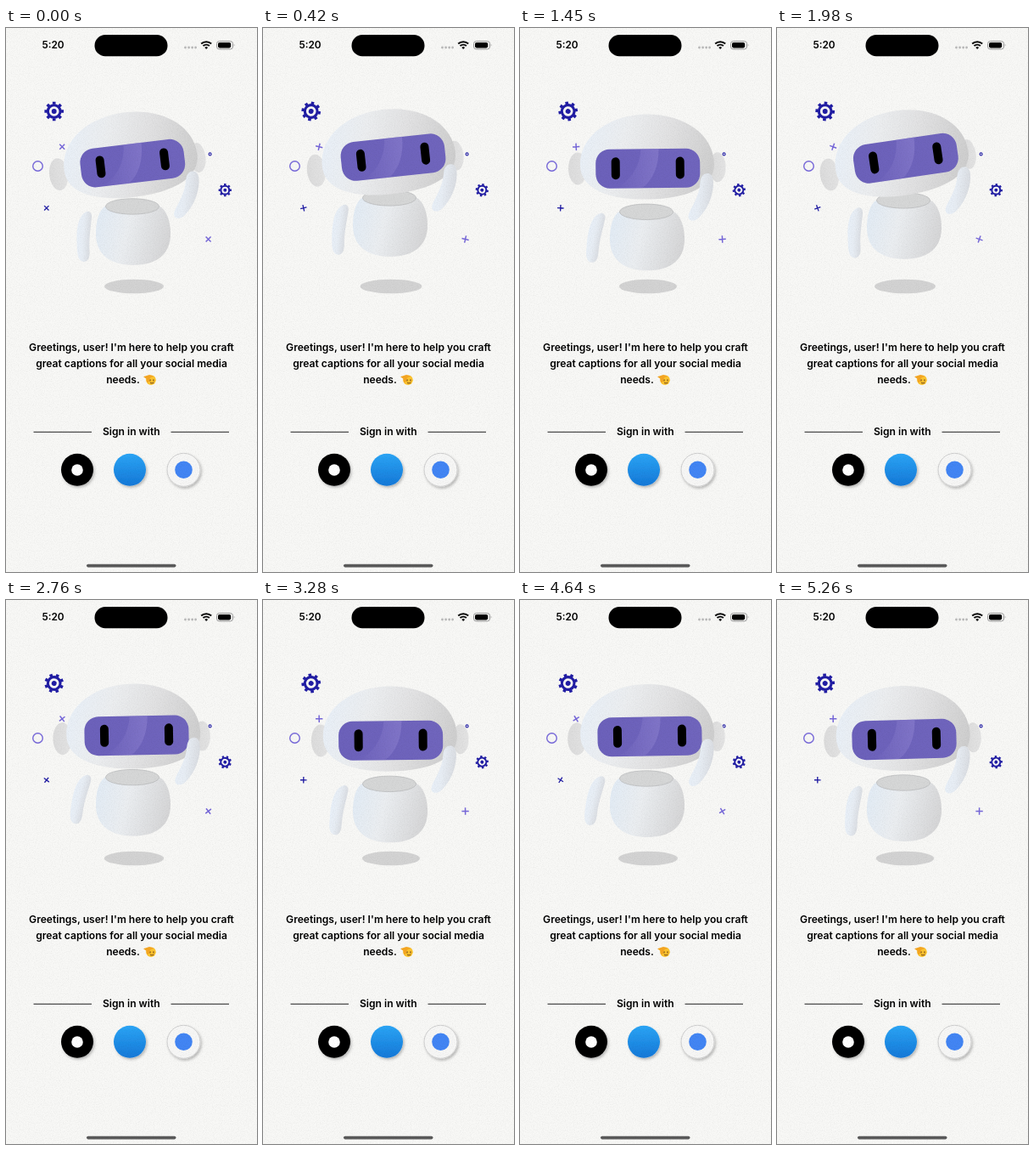
Write an HTML page that moves like this. It is 296 by 640 pixels and loops after 5.3 s.

```html
<!DOCTYPE html>
<html lang="en">
<head>
<meta charset="utf-8">
<title>Sign in</title>
<style>
  html, body { margin: 0; width: 100%; height: 100%; overflow: hidden; background: #f8f8f6; }
  svg { display: block; position: absolute; inset: 0; width: 296px; height: 640px; }
  text { font: 600 12.1px Inter, sans-serif; fill: #000; text-anchor: middle; }
  .clock { font-size: 11.8px; }
  .navy { stroke: #211da4; fill: none; }
  .violet { stroke: #7667d9; fill: none; }
</style>
</head>
<body>
<svg id="stage" viewBox="0 0 296 640">
  <defs>
    <linearGradient id="shell" x1="0" y1=".4" x2="1" y2=".6">
      <stop offset="0" stop-color="#e9f0f8"/><stop offset=".3" stop-color="#eceef0"/><stop offset=".6" stop-color="#e2e2e3"/><stop offset="1" stop-color="#cecece"/>
    </linearGradient>
    <linearGradient id="torso" x1="0" y1=".4" x2="1" y2=".6">
      <stop offset="0" stop-color="#e3ecf5"/><stop offset=".4" stop-color="#ebeef1"/><stop offset="1" stop-color="#d5d5d6"/>
    </linearGradient>
    <linearGradient id="limb" x1="0" y1="0" x2="1" y2=".2">
      <stop offset="0" stop-color="#e9f1fa"/><stop offset=".5" stop-color="#e8eef5"/><stop offset="1" stop-color="#dadde2"/>
    </linearGradient>
    <linearGradient id="ear"><stop offset="0" stop-color="#dcdcdc"/><stop offset="1" stop-color="#e4e4e4"/></linearGradient>
    <linearGradient id="glass"><stop offset="0" stop-color="#6c61bb"/><stop offset="1" stop-color="#7065bd"/></linearGradient>
    <linearGradient id="shine"><stop offset="0" stop-color="#8c80d0" stop-opacity="0"/><stop offset="1" stop-color="#8c80d0" stop-opacity=".6"/></linearGradient>
    <linearGradient id="blue" x1="0" y1="0" x2="0" y2="1"><stop offset="0" stop-color="#2ba5f6"/><stop offset="1" stop-color="#1478d8"/></linearGradient>
    <filter id="soft" x="-30%" y="-30%" width="160%" height="160%">
      <feDropShadow dx="1.5" dy="2" stdDeviation="1.6" flood-opacity=".25"/>
    </filter>
    <path id="plus" d="M-4.2,0H4.2M0,-4.2V4.2" stroke-width="1.5"/>
  </defs>

  <text class="clock" x="55.5" y="24.3">5:20</text>
  <rect x="104.5" y="8" width="86" height="25.300" rx="12.650"/>
  <g fill="#b9b9b9"><circle cx="211.5" cy="23" r="1.4"/><circle cx="215.6" cy="23" r="1.4"/><circle cx="219.7" cy="23" r="1.4"/><circle cx="223.6" cy="23" r="1.4"/></g>
  <g fill="none" stroke="#080808" stroke-width="2">
    <path d="M230.2,18.6A8.8,8.8 0 0 1 242.2,18.6M232.5,21.1A5.4,5.4 0 0 1 239.9,21.1"/>
    <path d="M236.2,25L234.3,22.9A2.8,2.8 0 0 1 238.1,22.9Z" fill="#080808" stroke="none"/>
  </g>
  <rect x="248.5" y="15.5" width="19" height="9.4" rx="3" fill="none" stroke="#999"/>
  <rect x="250" y="17" width="15.2" height="6.4" rx="1.8"/>
  <path d="M268.8,18.6q1.5,1.6 0,3.2z" fill="#999"/>

  <g id="decor">
    <circle class="violet" cx="37.5" cy="162.5" r="5.8" stroke-width="1.4"/>
    <circle class="navy" cx="240.6" cy="148.4" r="1.5" stroke-width="1.1"/>
  </g>

  <ellipse id="shadow" cx="151" cy="304" rx="35" ry="8.3" fill="#d3d3d3"/>

  <g id="body">
    <path d="M118,209C109,214 106,228 106,242C106,266 122,279 150,279C178,279 194,266 194,242C194,228 190,214 180,209Z" fill="url(#torso)"/>
    <ellipse cx="149" cy="210" rx="31.5" ry="9.2" fill="#d6d7d7" stroke="#bcbdbe" stroke-width=".8"/>
  </g>
  <path id="leftArm" d="M95,216C99,215 101.5,218 101,223C100,235 97.5,248 98.5,262C99,270 97,275 92,275C87,275 84.5,270 84,262C83,246 82,222 95,216Z" fill="url(#limb)"/>

  <g id="ears" fill="url(#ear)">
    <ellipse cx="-83" cy="13" rx="11" ry="19"/>
    <ellipse cx="82" cy="13" rx="9.5" ry="17.5"/>
  </g>
  <path id="head" d="M-79,9C-79,-26 -43,-50 0,-50C43,-50 79,-26 79,9C79,36 48,50 0,50C-48,50 -79,36 -79,9Z" fill="url(#shell)"/>
  <g id="visor">
    <rect x="-61.5" y="-23" width="123" height="46" rx="16.5" fill="url(#glass)"/>
    <path d="M-38,23Q-10,8 -8,-23H13C13,-3 6,14 -7,23Z" fill="url(#shine)"/>
    <rect x="-43" y="-13.3" width="10" height="26" rx="5"/>
    <rect x="33" y="-13.3" width="10" height="26" rx="5"/>
  </g>
  <path id="rightArm" d="M220,168.500C226,168 228,174 227.500,182C227,196 220,211 211,220C206,225 200,225 198.500,221C197,217 201,211 204,205C209,195 211,189 212,180C212.500,173 215,169 220,168.500Z" fill="url(#limb)"/>

  <text x="148" y="379.8">Greetings, user! I'm here to help you craft</text>
  <text x="148" y="398.8">great captions for all your social media</text>
  <text x="138" y="417.8">needs.</text>
  <g transform="translate(171 414.2)">
    <circle r="5.8" fill="#fcc42f"/>
    <path d="M-1,-.5v1.5M3,-.5v1.5M-.5,3.5q2,.7 3.400,-.2" stroke="#6b3f16" fill="none" stroke-linecap="round"/>
    <path d="M-9,-4L-2,-6.200L3.500,-4.600L-1,-2.600L-2.500,2L-5,3L-5.500,-1.400Z" fill="#f5a623"/>
  </g>

  <path d="M32.500,475.300H101M194.500,475.300H263" stroke="#222" stroke-width="1"/>
  <text x="147.8" y="479.3">Sign in with</text>
  <g filter="url(#soft)">
    <circle cx="84" cy="519.8" r="19" fill="#050505"/>
    <circle cx="146" cy="519.8" r="19" fill="url(#blue)"/>
    <circle cx="209.5" cy="519.8" r="19.5" fill="#f7f7f6" stroke="#cfcfcf"/>
  </g>
  <circle cx="84" cy="520" r="6.8" fill="#fff"/>
  <circle cx="209.5" cy="519.8" r="10.3" fill="#4285f4"/>
  <rect x="95" y="630.8" width="105.5" height="3.6" rx="1.8" fill="#5a5a5a"/>
</svg>

<svg viewBox="0 0 296 640" aria-hidden="true">
  <filter id="grain" x="0" y="0" width="100%" height="100%">
    <feTurbulence type="fractalNoise" baseFrequency=".9" numOctaves="2" seed="4"/>
    <feColorMatrix values="0 0 0 0 0  0 0 0 0 0  0 0 0 0 0  .1 0 0 0 -.04"/>
  </filter>
  <rect width="296" height="640" filter="url(#grain)"/>
</svg>

<script>
const LOOP = 5300, CYCLE = 1800;
const times = [0, 175, 520, 870, 1040, 1400, 1660];
const tracks = {
  bodyY:  [0, -7, -10, -3, 0, 6, 5],
  headX:  [146, 146, 148, 150, 150, 150, 148.5],
  headY:  [149, 147, 145.5, 148, 149, 151.5, 151],
  tilt:   [-6.8, -8.4, -5, -1.5, -1, -0.6, -1.5],
  visorX: [3.3, 5.8, 6, 5, 3, 1, 1.5],
  visorY: [10.2, 6.3, 7, 10, 11.5, 13.5, 13],
  earX:   [-3, -4, -3, -2, 0, 1, 0.5],
  leftY:  [0, -4.5, -9, -11, -8.5, 1, 3],
  leftTurn: [0, 0, 5, 10.5, 10, 8, 5],
  rightY: [0, -5, -9, -8, -5, 2, 3.5],
  rightX: [0, .5, 1.2, 1.5, 1, .5, 0],
  spin:   [45, 70, 75, 45, 32, 6, 0]
};

const byId = id => document.getElementById(id);
const place = (id, value) => byId(id).setAttribute("transform", value);

function add(parent, tag, attrs) {
  const node = document.createElementNS("http://www.w3.org/2000/svg", tag);
  for (const key in attrs) node.setAttribute(key, attrs[key]);
  return parent.appendChild(node);
}

function makeGear(x, y, r) {
  const holder = add(byId("decor"), "g", { transform: `translate(${x} ${y})` });
  const gear = add(holder, "g", { class: "navy" });
  add(gear, "circle", { r: r * .65, "stroke-width": r * .27 });
  add(gear, "circle", { r: r * .26, fill: "#211da4", stroke: "none" });
  for (let i = 0; i < 8; i++)
    add(gear, "path", { d: `M0,${-r * .72}V${-r}`, "stroke-width": r * .32, transform: `rotate(${i * 45})` });
  return gear;
}

function makePlus(x, y, scale, color, direction) {
  const holder = add(byId("decor"), "g", { transform: `translate(${x} ${y}) scale(${scale})` });
  return { node: add(holder, "use", { href: "#plus", class: color }), direction };
}

const gears = [makeGear(56.7, 98, 11.3), makeGear(258.3, 190.7, 7.6)];
const pluses = [
  makePlus(66.2, 139.8, 1, "violet", -1),
  makePlus(47.8, 211.8, .9, "navy", 1),
  makePlus(238.6, 248.5, 1, "violet", -1)
];

// Periodic cubic Hermite curve through the pose values
function sample(values, t) {
  const n = times.length;
  const at = i => times[(i + n) % n] + CYCLE * Math.floor(i / n);
  const val = i => values[(i + n) % n];
  const slope = i => (val(i + 1) - val(i - 1)) / (at(i + 1) - at(i - 1));
  let i = n - 1;
  while (times[i] > t) i--;
  const span = at(i + 1) - at(i), u = (t - at(i)) / span, v = 1 - u;
  return val(i) * v * v * (1 + 2 * u) + val(i + 1) * u * u * (3 - 2 * u)
    + span * u * v * (slope(i) * v - slope(i + 1) * u);
}

function draw(now) {
  const t = now % LOOP % CYCLE;
  const p = {};
  for (const name in tracks) p[name] = sample(tracks[name], t);

  place("body", `translate(0 ${p.bodyY})`);
  byId("shadow").setAttribute("rx", 35 - p.bodyY * .14);
  const headTurn = `rotate(${p.tilt})`;
  place("head", `translate(${p.headX} ${p.headY}) ${headTurn}`);
  place("ears", `translate(${p.headX} ${p.headY}) ${headTurn} translate(${p.earX} 0)`);
  place("visor", `translate(${p.headX + p.visorX} ${p.headY + p.visorY}) ${headTurn}`);
  place("leftArm", `translate(0 ${p.leftY}) rotate(${p.leftTurn} 96 217)`);
  place("rightArm", `translate(${p.rightX} ${p.rightY})`);
  for (const { node, direction } of pluses) node.setAttribute("transform", `rotate(${p.spin * direction})`);
  for (const gear of gears) gear.setAttribute("transform", `rotate(${t / CYCLE * 45})`);
}

const start = performance.now();
function tick() {
  draw(performance.now() - start);
  requestAnimationFrame(tick);
}
tick();
</script>
</body>
</html>
```
